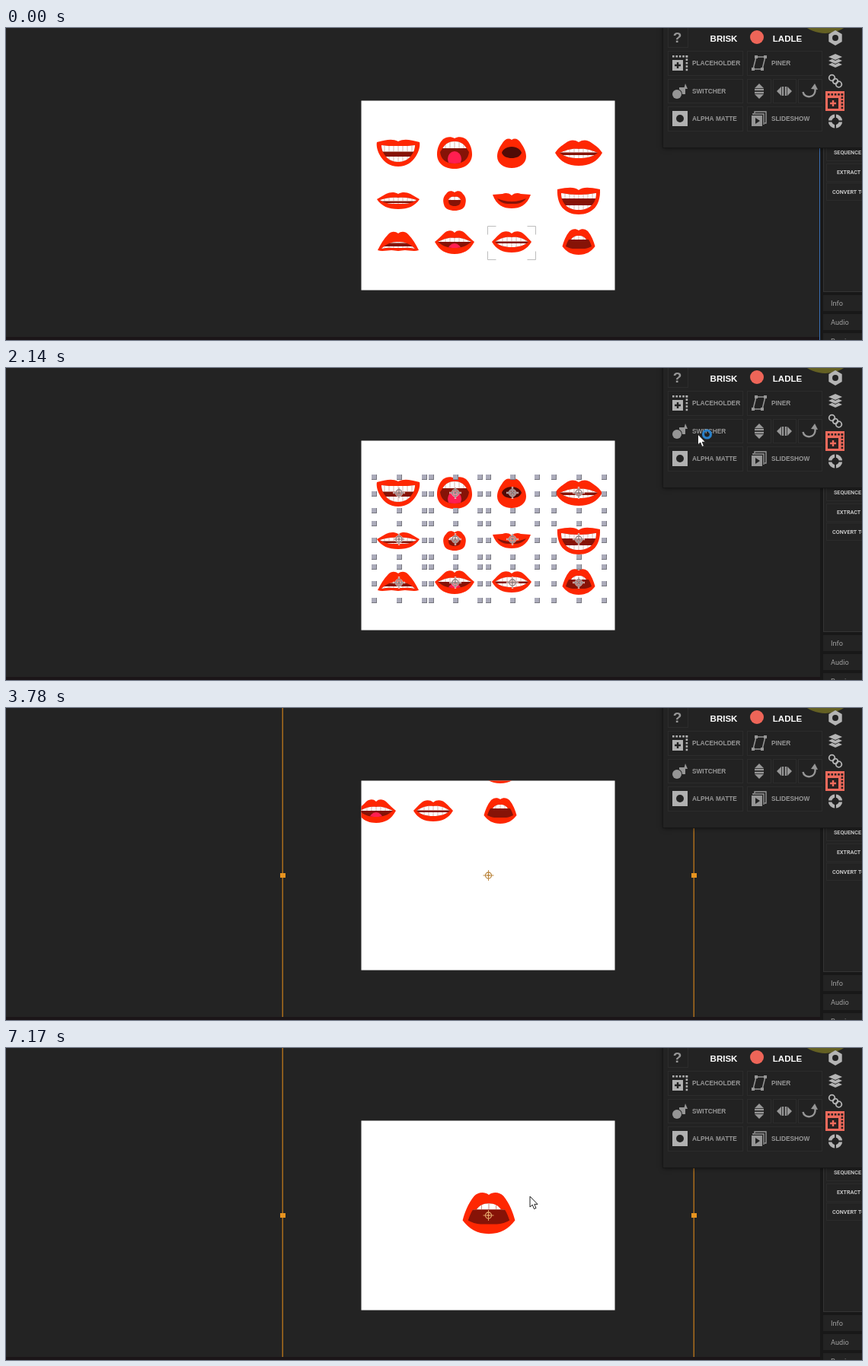
Animation, 1124 px wide and 410 px high, one loop 7450 ms. Source, as an HTML page with a canvas:

```html
<!DOCTYPE html>
<html lang="en">
<head>
<meta charset="utf-8">
<title>Mouth switcher</title>
<style>
html, body { margin: 0; width: 1124px; height: 410px; overflow: hidden; background: #232323; }
canvas { display: block; }
</style>
</head>
<body>
<canvas id="stage" width="1124" height="410"></canvas>
<script>
const g = document.getElementById('stage').getContext('2d');
const LOOP = 7450, GRAY = '#969696', BG = '#222222', ORANGE = '#e8941f';
const SANS = '"Liberation Sans", Arial, sans-serif', UI = 'Roboto, sans-serif';

// Right halves of the lips and the opening; up / low: edges of the teeth.
const mouths = [
  { lip: 'M0-15C8-19 16-17 28-14C30-6 22 18 0 18Z',
    gap: 'M0-9C10-9 16-9 22-10C22 0 14 12 0 12Z', up: -1.5, low: 5 },
  { lip: 'M0-19C5-22 11-21 15-18C20-13 23-6 23 2C23 14 13 21 0 21Z',
    gap: 'M0-15C7-15 12-12 15-7L19-1C18 8 12 14 0 14Z', up: -6, tongue: 8 },
  { lip: 'M0-17C4-20 9-18 12-13C16-7 19-2 19 5C19 14 10 20 0 20Z',
    gap: 'M0-8C7-8 12-4 13 0C11 5 6 7 0 7Z', dark: '#500b06' },
  { lip: 'M0-14C6-18 12-17 17-13C23-9 27-6 31 0C24 12 14 17 0 17Z',
    gap: 'M0-5C10-6 17-3 25 0C17 6 10 7 0 7Z', up: -.5, low: 3 },
  { lip: 'M0-9C6-12 11-11 16-9L28-2C22 7 13 11 0 11Z',
    gap: 'M0-4C10-5 17-3 24-1C17 4 9 4 0 4Z', up: .5, low: 3 },
  { lip: 'M0-11C4-14 9-13 11-9C16-4 15 1 14 5C13 11 6 13 0 13Z',
    gap: 'M0-5C5-6 8-3 8 0C8 5 5 7 0 7Z', up: -1 },
  { lip: 'M0-7C5-11 9-10 12-9L25-8C20 6 11 10 0 10Z',
    gap: 'M0 1C8 1 14-1 19-3C14 4 7 4 0 4Z' },
  { lip: 'M0-14C6-18 12-18 28-15C29 6 18 18 0 18Z',
    gap: 'M0-8C10-8 16-9 23-10C23 4 14 12 0 12Z', up: -3, low: 6 },
  { lip: 'M0-11C4-14 9-14 13-10C19-4 23 3 27 11C21 13 14 11 9 11C5 11 3 12 0 12Z',
    gap: 'M0 0C9 0 16 3 22 9C14 7 7 8 0 8Z', up: 1.5, low: 6 },
  { lip: 'M0-12C4-16 9-15 13-12C18-7 22-3 26 0C20 11 12 16 0 16Z',
    gap: 'M0-5C9-6 15-3 22 0C15 6 9 8 0 8Z', up: 0, tongue: 12 },
  { lip: 'M0-11C5-15 11-14 15-11C20-7 23-3 26 0C20 10 12 14 0 14Z',
    gap: 'M0-6C9-7 16-4 22 0C16 5 9 7 0 7Z', up: -.5, low: 2 },
  { lip: 'M0-15C4-18 9-17 12-14C17-8 20 0 21.5 6C16 13 10 17 0 17Z',
    gap: 'M0-8C5-8 8-6 10-3H13C15 0 16 3 17 6C10 10 6 9 0 9Z', up: -3 }
];
const mirrored = half => {
  const path = new Path2D(half);
  path.addPath(new Path2D(half), new DOMMatrix([-1, 0, 0, 1, 0, 0]));
  return path;
};
const colX = [515, 589, 664, 752], rowY = [164, 227, 281];
const boxX = [483, 558, 633, 719], boxW = [66, 64, 64, 66], boxY = [143, 204, 261];
mouths.forEach((m, i) => {
  const c = i % 4, r = i / 4 | 0;
  Object.assign(m, { lip: mirrored(m.lip), gap: mirrored(m.gap), x: colX[c], y: rowY[r],
    box: [boxX[c], boxY[r], boxW[c], 44] });
});

const rect = (x, y, w, h, fill) => { g.fillStyle = fill; g.fillRect(x, y, w, h); };
const frame = (x, y, w, h, color, width = 1) => {
  g.strokeStyle = color; g.lineWidth = width; g.strokeRect(x + .5, y + .5, w - 1, h - 1);
};
const disc = (x, y, r, fill) => {
  g.fillStyle = fill; g.beginPath(); g.arc(x, y, r, 0, 7); g.fill();
};
const ring = (x, y, r, color, width) => {
  g.strokeStyle = color; g.lineWidth = width; g.beginPath(); g.arc(x, y, r, 0, 7); g.stroke();
};
const shape = (d, fill) => { g.fillStyle = fill; g.fill(new Path2D(d)); };
const line = (d, color, width = 1) => {
  g.strokeStyle = color; g.lineWidth = width; g.stroke(new Path2D(d));
};
const text = (s, x, y, font, fill, align = 'left') => {
  g.font = font; g.fillStyle = fill; g.textAlign = align; g.fillText(s, x, y);
};
const at = (x, y, draw, scale = 1) => {
  g.save(); g.translate(x, y); g.scale(scale, scale); draw(); g.restore();
};

function mouth(m, x, y, scale) {
  at(x, y, () => {
    g.fillStyle = '#fe2702'; g.fill(m.lip);
    g.clip(m.gap);
    rect(-40, -40, 80, 80, m.dark || '#861307');
    if (m.tongue) {
      g.fillStyle = '#ff1e50';
      g.beginPath(); g.ellipse(0, m.tongue, 9, 10, 0, 0, 7); g.fill();
    }
    if (m.up !== undefined) teeth(-40, m.up);
    if (m.low !== undefined) teeth(m.low, 40);
  }, scale);
}
function teeth(top, bottom) {
  rect(-40, top, 80, bottom - top, '#fff');
  for (let x = -24; x <= 24; x += 6) rect(x - .3, top, .6, bottom - top, '#c98478');
}

function target(x, y, color, halo) {
  at(x, y, () => {
    if (halo) { ring(0, 0, 4, halo, 2.6); line('M0-8V8M-8 0H8', halo, 2.4); }
    ring(0, 0, 4, color, 1.3);
    line('M0-7V7M-7 0H7', color, 1);
    disc(0, 0, 1.4, color);
  });
}
function handles([x, y, w, h], yellow) {
  if (yellow) frame(x, y - 1, w, h, '#e3d36b');
  for (let i = 0; i < 9; i++) {
    if (i === 4) continue;
    const hx = x + w * (i % 3) / 2 - 3, hy = y + h * (i / 3 | 0) / 2 - 3;
    rect(hx, hy, 7, 7, '#77777f');
    rect(hx, hy, 6, 6, yellow && i % 2 === 0 ? '#c9c27e' : '#ababba');
  }
  if (yellow) disc(x + w - 1, y - 1, 5, 'rgba(225,205,60,.65)');
}
function bracket([x, y, w, h]) {
  at(x - .5, y - .5, () => line(`M0 11V0H11M${w - 12} 0H${w - 1}V11
    M${w - 1} ${h - 11}V${h}H${w - 12}M11 ${h}H0V${h - 11}`, '#bdbdbd'));
}

function placeholderIcon(x, y, color, back) {
  at(x, y, () => {
    rect(-10, -4, 14, 14, color);
    line('M-7 3H1M-3-1V7', back, 2.4);
    for (let i = 0; i < 5; i++) {
      rect(-10 + i * 4.4, -10, 2.6, 2.6, color);
      rect(7.6, -10 + i * 4.4, 2.6, 2.6, color);
    }
  });
}
function switcherIcon(color, back) {
  at(885, 83, () => {
    shape('M7-10L10-3H5Z', color);
    rect(-1, -5, 8, 9, color);
    disc(-4, 4, 7, back);
    disc(-4, 4, 6, color);
  });
}
function splitArrows() {
  shape('M-6-4L0-10L6-4ZM-6 4L0 10L6 4Z', GRAY);
  rect(-6, -3.2, 12, 2.4, GRAY);
  rect(-6, .8, 12, 2.4, GRAY);
}
function sideIcons() {
  at(1089, 13, () => {
    shape('M0-10L8.7-5V5L0 10L-8.7 5V-5Z', '#b4b4b4');
    disc(0, 0, 4, BG);
  });
  at(1089, 43, () => {
    for (const y of [5, 0, -5]) {
      shape(`M-10 ${y}L0 ${y - 5}L10 ${y}L0 ${y + 5}Z`, BG);
      shape(`M-9 ${y}L0 ${y - 4}L9 ${y}L0 ${y + 4}Z`, '#b4b4b4');
    }
  });
  ring(1084.5, 65.5, 3.8, '#b4b4b4', 1.8);
  ring(1089, 70, 3.3, '#b4b4b4', 1.8);
  ring(1093.5, 74, 3.8, '#b4b4b4', 1.8);
  rect(1076, 83, 25, 26, '#ef6a5c');
  placeholderIcon(1089, 96, '#2a2020', '#ef6a5c');
  ring(1089, 122.5, 7, '#b4b4b4', 4.5);
  at(1089, 122.5, () => line('M0-10V-3M0 3V10M-10 0H-3M3 0H10', BG, 1.8));
}

function sidebar(blueEdge) {
  rect(1069, 150, 4, 260, '#181818');
  if (blueEdge) rect(1068, 158, 1, 252, '#3a6fb5');
  frame(1073, 150, 60, 197, '#343434');
  ['SEQUENCE', 'EXTRACT', 'CONVERT TO'].forEach((s, i) => {
    const y = [163, 189.5, 215][i];
    frame(1077, Math.round(y - 12), 60, 24, '#2b2b2b');
    text(s, [1087, 1091, 1085][i], y + .5, '500 7.2px ' + UI, '#dcdcdc');
  });
  rect(1072, 347, 52, 63, '#181818');
  ['Info', 'Audio', 'Preview'].forEach((s, i) => {
    rect(1073, 351 + i * 25, 51, 21, '#232323');
    text(s, 1083, 362 + i * 25, '9.2px ' + UI, '#a0a0a0');
  });
}

function toolPanel(hot, outlined) {
  g.save();
  g.shadowColor = 'rgba(0,0,0,.6)'; g.shadowBlur = 6;
  rect(863, -5, 270, 163, '#232323');
  g.restore();
  frame(862, -5, 270, 163, outlined ? '#3477bd' : '#171717');
  disc(1076, -38, 45, '#646023');

  const cells = [[869, -4, 27, 30], [869, 30, 99, 33], [973, 30, 99, 33], [869, 67, 99, 32], [973, 67, 32, 32],
    [1007, 67, 31, 32], [1040, 67, 32, 32], [869, 103, 99, 33], [973, 103, 99, 33]];
  for (const c of cells) { rect(...c, BG); frame(...c, '#2c2c2c'); }
  if (hot) rect(869, 67, 98, 31, '#efefef');

  text('?', 881.5, 13.5, 'bold 19px ' + SANS, GRAY, 'center');
  const title = 'bold 11.5px ' + SANS;
  text('BRISK', 942.5, 14.5, title, '#fff', 'center');
  text('LADLE', 1026, 14.5, title, '#fff', 'center');
  disc(986, 12, 9, '#ee6558');

  const label = (s, x, y, fill = GRAY) => text(s, x, y + .5, 'bold 8.3px ' + SANS, fill);
  label('PLACEHOLDER', 901, 46);
  label('PINER', 1005, 46);
  label('SWITCHER', 901, 83, hot ? '#1c1c1c' : GRAY);
  label('ALPHA MATTE', 901, 119.5);
  label('SLIDESHOW', 1005, 119.5);

  placeholderIcon(885, 46, '#b0b0b0', BG);
  at(989, 46, () => {
    line('M-4-8H8L4 8H-8Z', GRAY, 1.5);
    for (const [x, y] of [[-4, -8], [8, -8], [4, 8], [-8, 8]]) rect(x - 2, y - 2, 4, 4, GRAY);
  });
  switcherIcon(hot ? '#1c1c1c' : GRAY, hot ? '#efefef' : BG);
  at(989, 83, splitArrows);
  at(1022, 83, () => { g.rotate(Math.PI / 2); splitArrows(); });
  at(1055, 83, () => {
    line('M-8.5 1C-7 10 9 10 7.5-4', GRAY, 2.4);
    shape('M2-3L7-10L11-2Z', GRAY);
  });
  rect(875, 109, 20, 20, '#b0b0b0');
  disc(885, 119, 5, BG);
  at(989, 119, () => {
    line('M-6-7V-9H9V6H7M-8-5V-7', GRAY, 1.4);
    line('M-8-6H6V8', GRAY, 1.4);
    rect(-10, -4, 14, 14, GRAY);
    shape('M-5-1L1 3L-5 7Z', BG);
  });
  sideIcons();
}

function cursor(x, y, busy) {
  at(x, y, () => {
    const d = 'M0 0V14L3.2 11L5.5 16.5L8 15.4L5.8 10.3H10Z';
    shape(d, '#fff');
    line(d, '#222', 1);
    if (busy) ring(12, 0, 5, '#2a80c8', 3.2);
  });
}
const ease = p => p * p * (3 - 2 * p);
// Keys are [time, x, y]; the pointer rests outside them.
function along(keys, t) {
  let prev = keys[0];
  for (const key of keys) {
    if (t < key[0]) {
      const p = ease(Math.max(0, (t - prev[0]) / (key[0] - prev[0])));
      return [prev[1] + (key[1] - prev[1]) * p, prev[2] + (key[2] - prev[2]) * p];
    }
    prev = key;
  }
  return [prev[1], prev[2]];
}
const pointerKeys = [[4480, 850, 112], [4760, 704, 158], [6120, 704, 158], [6820, 699, 232], [7170, 688, 195]];

function draw(t) {
  const within = (a, b) => t >= a && t < b;
  const composed = t >= 3640, single = t >= 3920;
  rect(0, 0, 1124, 410, '#232323');
  rect(0, 406, 1069, 4, '#1b1518');

  g.save();
  g.beginPath(); g.rect(466.5, 95.5, 333, 249); g.clip();
  rect(466, 95, 334, 250, '#fff');
  if (single) mouth(mouths[11], 634, 217, 1.6);
  else for (const m of mouths) mouth(m, m.x - (composed ? 103 : 0), m.y - (composed ? 146 : 0), 1);
  g.restore();

  const hovered = t < 140 ? 10 : t < 630 ? 0 : within(1060, 1370) ? 9 : within(1370, 1650) ? 11 : -1;
  if (hovered >= 0) bracket(mouths[hovered].box);
  const chosen = within(630, 1720) ? [mouths[0]] : within(1720, 2840) ? mouths : [];
  for (const m of chosen) {
    const [x, y, w, h] = m.box;
    handles(m.box, within(990, 1720));
    target(x + w / 2, y + h / 2 - 1, '#8d7f7f', 'rgba(255,235,235,.7)');
  }

  if (composed) {
    for (const x of [363, 903]) {
      rect(x - .5, 0, 1.5, 406, '#a96c1d');
      rect(x - 3, 217, 7, 6, ORANGE);
    }
    target(633.5, 220, single ? '#dfa066' : '#bd8a45');
  }

  sidebar(t < 630);
  toolPanel(within(2420, 3640), within(2560, 3640));
  if (within(2070, 2420)) cursor(908.5, 87, true);
  if (t >= 4480) cursor(...along(pointerKeys, t), within(5670, 5880));
}

g.textBaseline = 'middle';
const start = performance.now();
(function tick() {
  draw((performance.now() - start) % LOOP);
  requestAnimationFrame(tick);
})();
</script>
</body>
</html>
```
